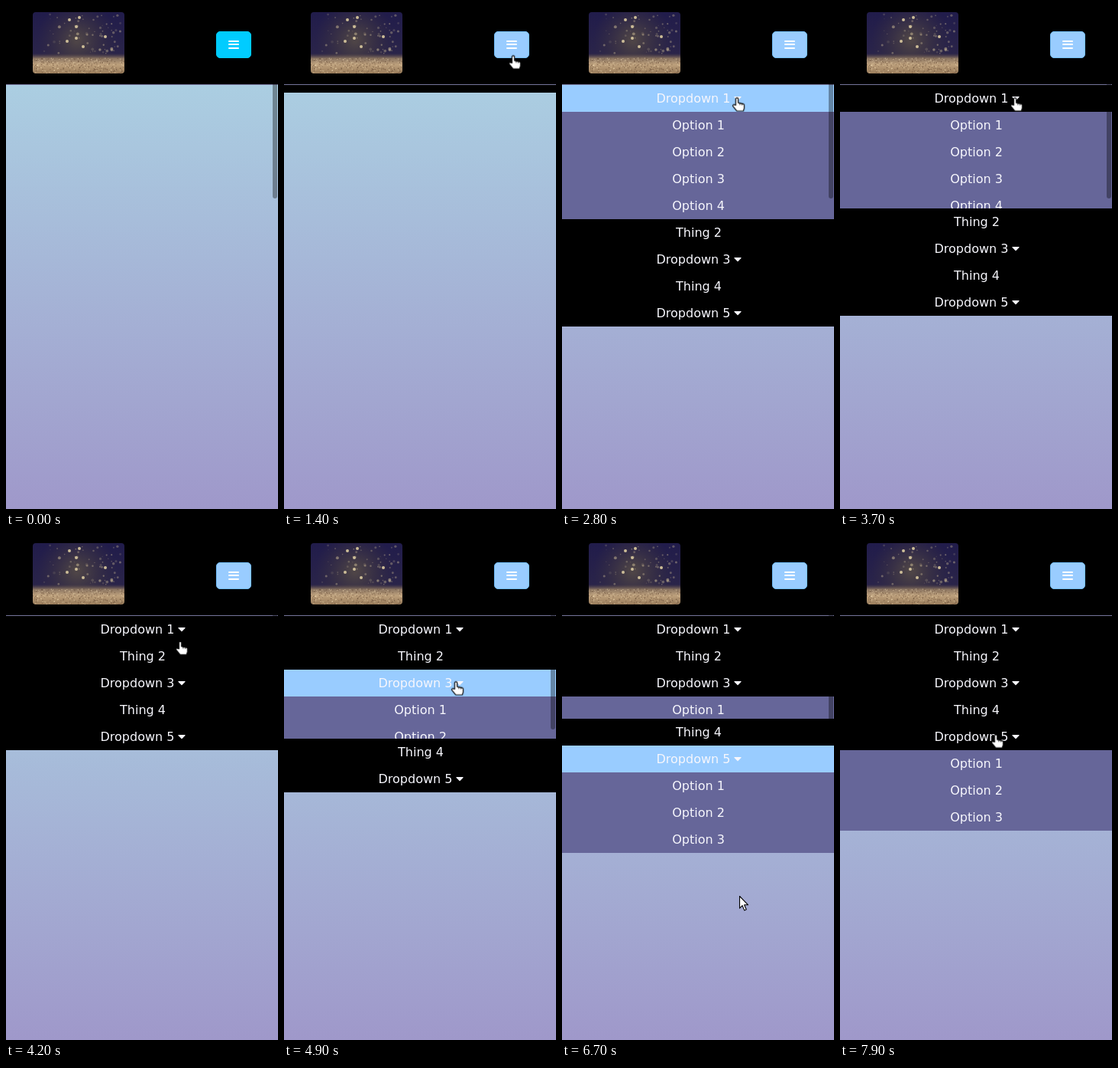
An HTML page with a canvas that plays this animation: 356 px wide and 656 px high, repeating every 8000 ms.

```html
<!DOCTYPE html>
<html lang="en">
<head>
<meta charset="utf-8">
<title>Dropdown menu</title>
<style>
  * { box-sizing: border-box; margin: 0; padding: 0; }
  html, body { width: 100%; height: 100%; overflow: hidden; }
  body {
    position: relative;
    background: linear-gradient(#add8e6, #9f98ca);
    font: 16px/35px "DejaVu Sans", sans-serif;
    color: #f6f6fc;
    text-align: center;
  }
  header { height: 103px; background: #000; border-bottom: 1px solid #74749a; }
  #logo { position: absolute; left: 35px; top: 8px; border-radius: 4px; }
  ul { list-style: none; }
  li { background: #000; }
  .row { height: 35px; padding-left: 2px; }
  .row svg { width: 10px; height: 16px; margin-left: -1px; vertical-align: -2px; fill: currentColor; }

  .anim, .toggle { animation: 8s ease infinite; }
  .toggle { animation-timing-function: step-end; }

  .button {
    position: absolute; left: 275px; top: 33px; width: 46px; height: 35px;
    border: 1px solid #0cf; border-radius: 5px; background: #0cf;
    animation-name: hover;
  }
  .button i { position: absolute; left: 15px; width: 14px; height: 2px; border-radius: 1px; background: #fff; }

  /* Panels ease a generous max-height, so short ones open early and close late. */
  .panel { max-height: 0; overflow: hidden; }
  .options li { background: #669; height: 35px; padding-left: 1px; }
  #menu { animation-name: menu; }
  #panel1 { animation-name: panel1; }
  #panel3 { animation-name: panel3; }
  #panel5 { animation-name: panel5; }
  #row1 { animation-name: row1; }
  #row3 { animation-name: row3; }
  #row5 { animation-name: row5; }

  .scrollbar {
    position: absolute; left: 349px; top: 0; width: 6px; height: 251px;
    border-radius: 3px; background: rgba(0, 0, 0, .35);
    animation-name: scrollbar;
  }
  .cursor { position: absolute; left: 0; top: 0; animation-name: travel; animation-timing-function: ease-in-out; }
  .cursor svg {
    position: absolute; left: -8px; top: -4px; overflow: visible; transform-origin: 8px 4px;
    fill: #fff; stroke: #000; stroke-width: 1.1; stroke-linejoin: round;
  }
  .arrow { animation-name: arrow; }
  .hand { animation-name: hand; transform: scale(1.1); }

  @keyframes hover {
    0%, 9.6% { background: #0cf; border-color: #0cf; }
    11.3%, 100% { background: #9cf; border-color: #74bfff; }
  }
  @keyframes menu { 0%, 17.25% { max-height: 0; } 23.75%, 100% { max-height: 400px; } }
  @keyframes panel1 {
    0%, 32% { max-height: 0; }
    38.5%, 43.65% { max-height: 400px; }
    50.15%, 100% { max-height: 0; }
  }
  @keyframes panel3 {
    0%, 60.45% { max-height: 0; }
    66.95%, 79.41% { max-height: 400px; }
    85.91%, 100% { max-height: 0; }
  }
  @keyframes panel5 { 0%, 79.41% { max-height: 0; } 85.91%, 100% { max-height: 400px; } }

  @keyframes row1 { 0% { background: #000; } 31.4% { background: #9cf; } 43.1%, 100% { background: #000; } }
  @keyframes row3 { 0% { background: #000; } 59.7% { background: #9cf; } 79.4%, 100% { background: #000; } }
  @keyframes row5 { 0% { background: #000; } 78.5% { background: #9cf; } 97.25%, 100% { background: #000; } }

  @keyframes scrollbar {
    0%, 6% { opacity: 1; }
    11%, 32% { opacity: 0; }
    32.5%, 86% { opacity: 1; }
    91%, 100% { opacity: 0; }
  }
  @keyframes travel {
    0%, 1% { transform: translate(370px, 222px); }
    11.25% { transform: translate(300px, 60px); }
    15%, 18% { transform: translate(300px, 65px); }
    27.5% { transform: translate(241px, 107px); }
    30.5%, 50.6% { transform: translate(229px, 120px); }
    56.25%, 69.4% { transform: translate(225px, 189px); }
    77.5%, 79% { transform: translate(234px, 468px); }
    82%, 84.5% { transform: translate(232px, 468px); }
    91.25% { transform: translate(255px, 500px); }
    95%, 100% { transform: translate(204px, 258px); }
  }
  @keyframes hand {
    0% { opacity: 0; } 10% { opacity: 1; } 19% { opacity: 0; }
    26.9% { opacity: 1; } 82.4% { opacity: 0; } 93.1%, 100% { opacity: 1; }
  }
  @keyframes arrow {
    0% { opacity: 1; } 10% { opacity: 0; } 19% { opacity: 1; }
    26.9% { opacity: 0; } 82.4% { opacity: 1; } 93.1%, 100% { opacity: 0; }
  }
</style>
</head>
<body>
<header>
  <canvas id="logo" width="120" height="80"></canvas>
  <div class="button anim"><i style="top:11px"></i><i style="top:15.4px"></i><i style="top:19.8px"></i></div>
</header>
<ul id="menu" class="panel anim"></ul>
<div class="scrollbar anim"></div>
<div class="cursor anim">
  <svg class="arrow toggle" width="28" height="28" viewBox="-8 -4 28 28">
    <path d="M.5 .5V16.2l3.6-3.5 2.6 6.2 2.5-1.1-2.6-6h5z"/>
  </svg>
  <svg class="hand toggle" width="28" height="28" viewBox="-8 -4 28 28">
    <path d="M-1.5 8.5V1.3a1.5 1.5 0 0 1 3 0V5.6l5.7 1.2a2 2 0 0 1 1.5 2V12l-1.1 3.3H-.3L-4.6 10a1.3 1.3 0 0 1 1.9-1.8z"/>
    <path d="M3.6 6v2.3M6 6.6v2" stroke-width=".8"/>
  </svg>
</div>
<script>
  // Option count per menu entry; zero is a plain link.
  const entries = [4, 0, 6, 0, 3];
  const caret = '<svg viewBox="0 0 10 16"><path d="M1 6h8c.56 0 .84.67.44 1.07l-4 4.02a.63.63 0 0 1-.88 0l-4-4.02C.14 6.67.42 6 1 6z"/></svg>';

  const options = count => Array.from({ length: count }, (_, i) => `<li>Option ${i + 1}</li>`).join('');

  document.getElementById('menu').innerHTML = entries.map((count, i) => {
    const n = i + 1;
    if (!count) return `<li><div class="row">Thing ${n}</div></li>`;
    return `<li><div id="row${n}" class="row toggle">Dropdown ${n} ${caret}</div>
      <ul id="panel${n}" class="panel options anim">${options(count)}</ul></li>`;
  }).join('');

  function paintLogo() {
    const g = document.getElementById('logo').getContext('2d');
    let seed = 7;
    const rand = () => (seed = seed * 16807 % 2147483647) / 2147483647;
    const fill = (gradient, stops, y, h) => {
      stops.forEach(([at, color]) => gradient.addColorStop(at, color));
      g.fillStyle = gradient;
      g.fillRect(0, y, 120, h);
    };
    const dot = (x, y, r, color) => {
      g.fillStyle = color;
      g.beginPath();
      g.arc(x, y, r, 0, 7);
      g.fill();
    };

    fill(g.createLinearGradient(0, 0, 0, 60), [[0, '#211c4b'], [1, '#2b2549']], 0, 80);
    fill(g.createRadialGradient(58, 36, 4, 58, 36, 52),
      [[0, 'rgba(84,74,70,.85)'], [1, 'rgba(60,50,60,0)']], 0, 80);
    fill(g.createLinearGradient(0, 54, 0, 80),
      [[0, 'rgba(96,78,70,0)'], [.25, '#8d7763'], [.55, '#bda07c'], [1, '#9a7d5c']], 54, 26);

    for (let i = 0; i < 70; i++) {
      dot(15 + rand() * 100, 3 + rand() * 52, .5 + rand() * 1.5, `rgba(205,188,150,${.12 + rand() * .4})`);
    }
    for (let i = 0; i < 320; i++) {
      dot(rand() * 120, 60 + rand() * 20, .7, rand() < .5 ? 'rgba(238,216,176,.55)' : 'rgba(95,70,50,.5)');
    }
    [[57, 19], [57, 34], [48, 10], [66, 45], [61, 7], [45, 38], [95, 32]]
      .forEach(([x, y]) => dot(x, y, 2, '#cdbd98'));
  }
  paintLogo();
</script>
</body>
</html>
```
